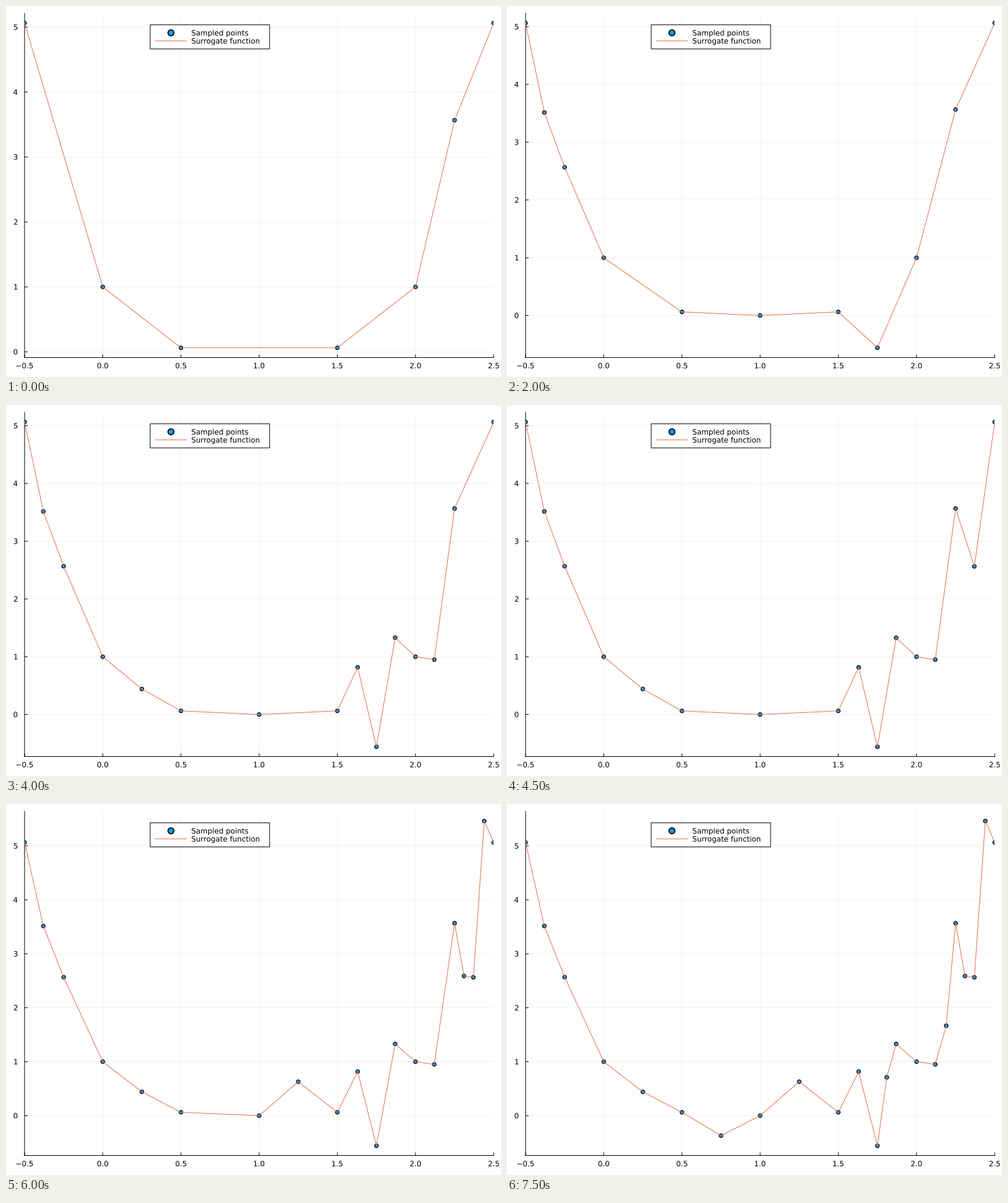
Recreate the animation shown at these times as a matplotlib script. Size 800 px wide and 600 px high, loop 8000 ms.

```python
import numpy as np
import matplotlib.pyplot as plt
from matplotlib.animation import FuncAnimation
from matplotlib.patches import Circle, PathPatch, Rectangle
from matplotlib.textpath import TextPath
from matplotlib.transforms import Affine2D, ScaledTranslation

W, H, DPI = 800, 600, 100
PX = 72 / DPI  # points per pixel
BLUE, ORANGE = "#009afa", "#e26f46"
LEFT, RIGHT, TOP, BOTTOM = 30, 788.19, 11.81, 568.5
TICK = 5
FONT = 11.9
CAP = 0.729 * FONT

START = [-0.5, 0, 0.5, 1.5, 2, 2.25, 2.5]
ADDED = [-0.25, 1, 1.75, -0.38, 0.25, 1.87, 1.63, 2.12,
         2.37, 2.44, 2.31, 1.25, 0.75, 2.19, 1.81]
XTICKS = np.arange(-0.5, 2.6, 0.5)
YTICKS = range(6)

plt.rcParams.update({
    "font.family": "DejaVu Sans",
    "path.snap": False,
    "axes.linewidth": PX,
})


def objective(x):
    return (x - 1) ** 4 + x / 2 * np.sin(10 * np.pi * x)


def write(ax, text, anchor, coords, dx, dy, align=0.0):
    """Outline text at a pixel offset from an anchor, centred on its cap height."""
    path = TextPath((0, 0), text, size=FONT)
    box = path.get_extents()
    shift = Affine2D().translate(dx - box.x0 - align * box.width, dy - CAP / 2)
    ax.add_patch(PathPatch(shift.transform_path(path), fc="black", lw=0, clip_on=False,
                           transform=ScaledTranslation(*anchor, coords)))


fig = plt.figure(figsize=(W / DPI, H / DPI), dpi=DPI, facecolor="white")
ax = fig.add_axes([LEFT / W, 1 - BOTTOM / H, (RIGHT - LEFT) / W, (BOTTOM - TOP) / H])
ax.set(xlim=(-0.5, 2.5), xticks=XTICKS, yticks=YTICKS)
ax.spines[["top", "right"]].set_visible(False)
ax.set_axisbelow(True)
ax.grid(color="black", alpha=0.1, lw=0.55 * PX)
ax.tick_params(length=0, labelbottom=False, labelleft=False)

# Markers sized one by one keep their sub-pixel positions.
dots = ax.scatter([], [], fc=BLUE, ec="black", lw=1.2 * PX, zorder=3)
curve, = ax.plot([], [], color=ORANGE, lw=PX, zorder=4)


def add_ticks():
    xaxis, yaxis = ax.get_xaxis_transform(), ax.get_yaxis_transform()
    style = dict(color="black", lw=PX, clip_on=False)
    ax.vlines(XTICKS, 0, TICK / (BOTTOM - TOP), transform=xaxis, **style)
    ax.hlines(YTICKS, 0, TICK / (RIGHT - LEFT), transform=yaxis, **style)
    for x in XTICKS:
        write(ax, f"{x:.1f}".replace("-", "\u2212"), (x, 0), xaxis, 0, -13.1, 0.5)
    for y in YTICKS:
        write(ax, str(y), (0, y), yaxis, -11.6, 0, 1)


def add_legend():
    """Legend laid out in stage pixels, y pointing down."""
    leg = fig.add_axes([0, 0, 1, 1], zorder=5)
    leg.set(xlim=(0, W), ylim=(H, 0))
    leg.axis("off")
    top, row = 30.37, 13
    first, second = top + row, top + 2 * row
    leg.add_patch(Rectangle((233, top), 193, 3 * row, fc="white", ec="black", lw=PX))
    leg.add_patch(Circle((266.6, first), 4.8, fc=BLUE, ec="black", lw=1.7 * PX))
    leg.plot([241.3, 292], [second, second], color=ORANGE, lw=PX)
    write(leg, "Sampled points", (300.2, first), leg.transData, 0, 0)
    write(leg, "Surrogate function", (300.2, second), leg.transData, 0, 0)


def update(i):
    x = np.sort(START + ADDED[:i])
    y = objective(x)
    dots.set_offsets(np.column_stack([x, y]))
    dots.set_sizes(np.full(len(x), (6 * PX) ** 2))
    curve.set_data(x, y)
    margin = 0.03 * np.ptp(y)
    ax.set_ylim(y.min() - margin, y.max() + margin)
    return dots, curve


add_ticks()
add_legend()
anim = FuncAnimation(fig, update, frames=len(ADDED) + 1, interval=500,
                     repeat=True, repeat_delay=0)
plt.show()
```
